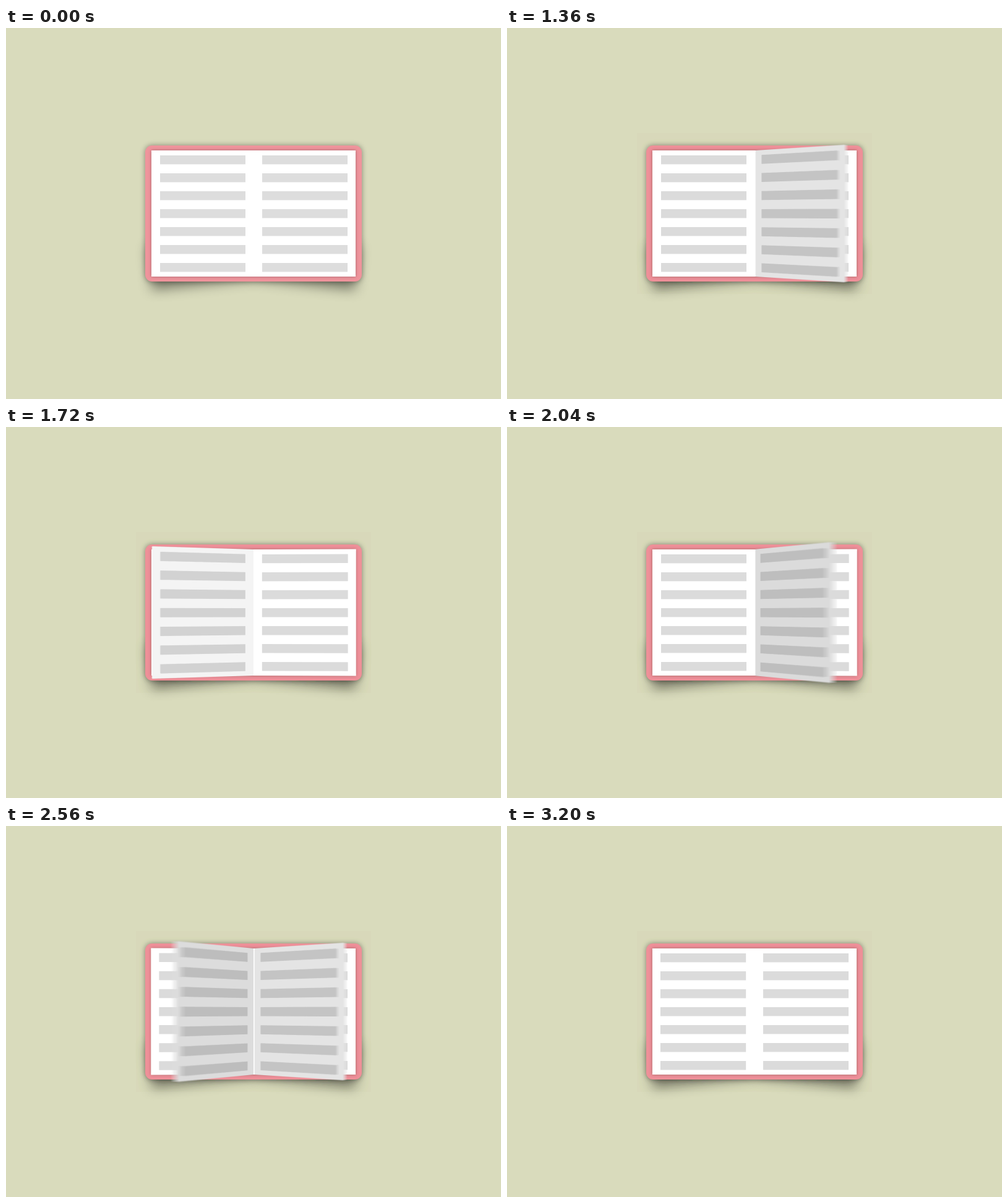
An HTML page with a canvas for the animation above (3.4 s loop, 800 by 600 pixels).

```html
<!DOCTYPE html>
<html lang="en">
<head>
<meta charset="utf-8">
<title>Book loader</title>
<style>
  html, body { margin: 0; width: 100%; height: 100%; overflow: hidden; background: #d9dbbc; }
  canvas { display: block; width: 800px; height: 600px; }
</style>
</head>
<body>
<canvas id="stage" width="800" height="600"></canvas>
<script>
const W = 800, H = 600, CX = 400, CY = 300;
const LOOP = 3400, STEP = 40, LAST = 3200;
const STARTS = [960, 1600, 1920, 2160], TURN = 1080;
const SHUTTER = 20, SAMPLES = 20;
const CAMERA = W * 50 / 36;
const EASE = 0.67;
const PAGE_W = 165, PAGE_H = 204;
const RAD = Math.PI / 180;

const out = document.getElementById('stage').getContext('2d');
const layer = () => {
  const canvas = document.createElement('canvas');
  canvas.width = W;
  canvas.height = H;
  return canvas.getContext('2d');
};
const base = layer(), scene = layer();

// Paints only the shadow of a box, by keeping the box itself off stage.
function shadow(x, y, w, h, radius, blur, alpha, turn = 0) {
  base.save();
  base.shadowColor = `rgba(0,0,0,${alpha})`;
  base.shadowBlur = blur;
  base.shadowOffsetX = 2000;
  base.translate(x + w / 2 - 2000, y + h / 2);
  base.rotate(turn * RAD);
  base.fillStyle = '#000';
  base.beginPath();
  base.roundRect(-w / 2, -h / 2, w, h, radius);
  base.fill();
  base.restore();
}

function barRows(draw) {
  for (let i = 0; i < 7; i++) draw(-94 + 29 * i, 14.4);
}

function drawBase() {
  base.fillStyle = '#d9dbbc';
  base.fillRect(0, 0, W, H);
  shadow(232, 345, 165, 70, 0, 20, 0.45, -6);
  shadow(403, 345, 165, 70, 0, 20, 0.45, 6);
  shadow(225, 190, 350, 220, 11, 8, 0.4);
  base.fillStyle = '#ef949c';
  base.beginPath();
  base.roundRect(225, 190, 350, 220, 11);
  base.fill();
  shadow(235, 198, 330, PAGE_H, 0, 5, 0.3);
  base.fillStyle = '#fff';
  base.fillRect(235, 198, 330, PAGE_H);
  base.fillStyle = '#ddd';
  barRows((y, h) => {
    base.fillRect(249, CY + y, 138, h);
    base.fillRect(414, CY + y, 138, h);
  });
}

function ease(p) {
  if (p <= 0) return 0;
  if (p >= 1) return 1;
  let lo = 0, hi = 1, s;
  for (let i = 0; i < 24; i++) {
    s = (lo + hi) / 2;
    const x = 3 * EASE * s * (1 - s) ** 2 + 3 * (1 - EASE) * s * s * (1 - s) + s ** 3;
    if (x < p) lo = s; else hi = s;
  }
  return s * s * (3 - 2 * s);
}

const gray = (level, shade) => {
  const v = level * (1 - shade);
  return `rgb(${v},${v},${v})`;
};

function drawPage(angle) {
  const cos = Math.cos(angle * RAD), sin = Math.sin(angle * RAD);
  const fold = Math.min(1, Math.min(angle, 180 - angle) / 52);
  const shade = 0.14 * fold * fold * (3 - 2 * fold);
  const point = (u, y) => {
    const scale = CAMERA / (CAMERA - u * sin);
    return [CX + u * cos * scale, CY + y * scale];
  };
  const quad = (u0, u1, y, h, color) => {
    scene.fillStyle = color;
    scene.beginPath();
    scene.moveTo(...point(u0, y));
    scene.lineTo(...point(u1, y));
    scene.lineTo(...point(u1, y + h));
    scene.lineTo(...point(u0, y + h));
    scene.fill();
  };
  quad(angle < 90 ? 2 : 0, PAGE_W, -PAGE_H / 2, PAGE_H, gray(255, shade));
  barRows((y, h) => quad(13.8, 152, y, h, gray(221, shade)));
}

function drawScene(time, starts) {
  scene.drawImage(base.canvas, 0, 0);
  const angles = starts.map(start => 180 * ease((time - start) / TURN));
  angles.filter(a => a < 90).reverse().forEach(drawPage);
  angles.filter(a => a >= 90).forEach(drawPage);
}

function render(time) {
  const active = STARTS.filter(start => time >= start && time < start + TURN);
  const count = active.length ? SAMPLES : 1;
  for (let k = 0; k < count; k++) {
    drawScene(time + SHUTTER * ((k + 0.5) / count - 0.5), active);
    out.globalAlpha = 1 / (k + 1);
    out.drawImage(scene.canvas, 210, 170, 380, 260, 210, 170, 380, 260);
  }
  out.globalAlpha = 1;
}

drawBase();
out.drawImage(base.canvas, 0, 0);

const began = performance.now();
let shown = -1;
function tick() {
  const elapsed = (performance.now() - began) % LOOP;
  const time = Math.min(LAST, Math.floor(elapsed / STEP) * STEP);
  if (time !== shown) render(shown = time);
  requestAnimationFrame(tick);
}
tick();
</script>
</body>
</html>
```
